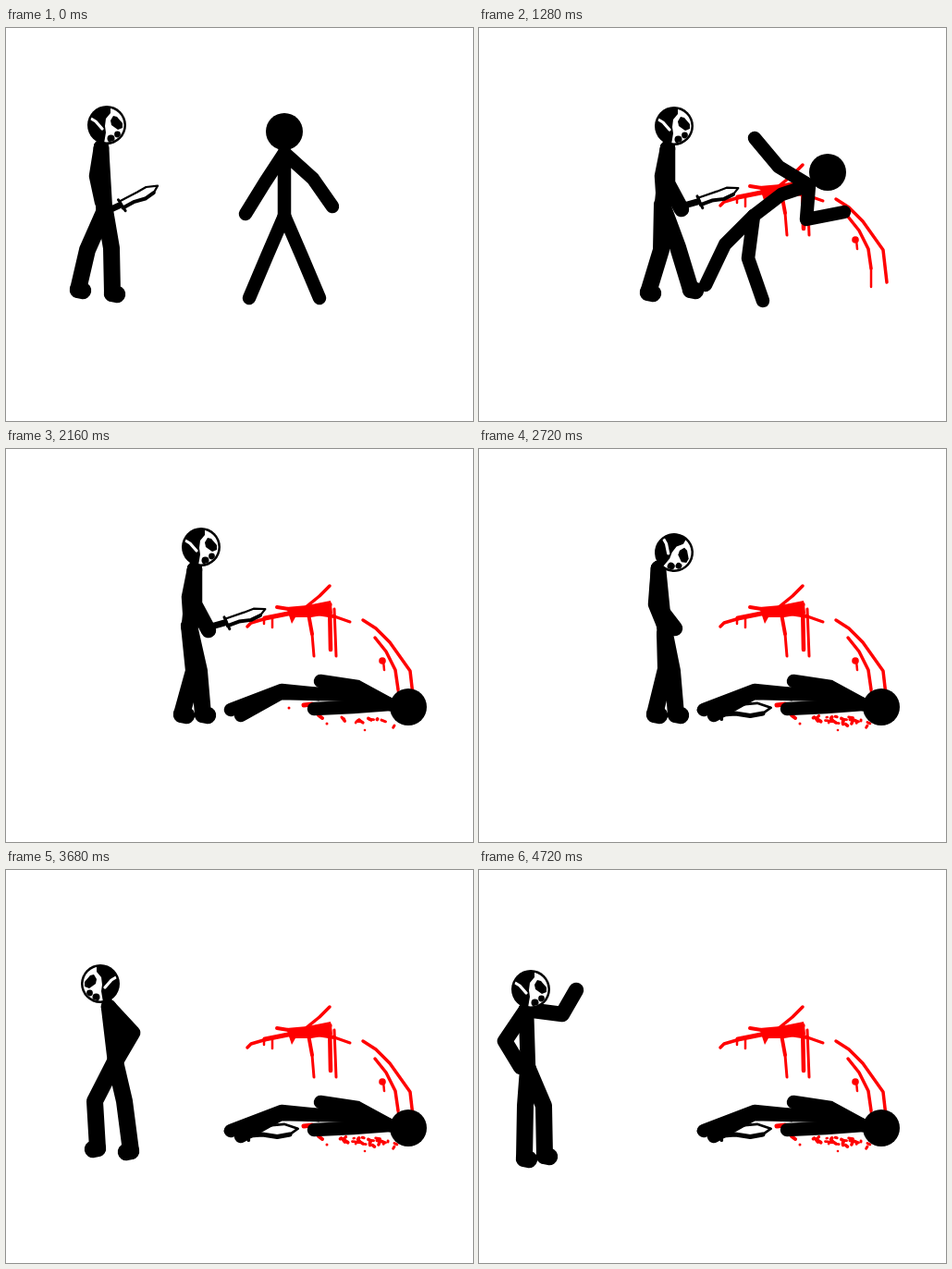
Recreate the animation shown at these times as an HTML page with a canvas. Size 505 by 425 pixels, loop 5.2 s.

```html
<!DOCTYPE html>
<html>
<head>
<meta charset="utf-8">
<style>
html, body { margin: 0; width: 100%; height: 100%; overflow: hidden; background: #fff; }
canvas { display: block; }
</style>
</head>
<body>
<canvas id="stage" width="505" height="425"></canvas>
<script>
const ctx = document.getElementById('stage').getContext('2d');
const LOOP = 5200, TICK = 80, RED = '#f00';
const killer = [], victim = [];

// Each key inherits the points it does not mention from the key before it.
function key(track, time, pose = {}) {
  track.push({ ...track[track.length - 1], ...pose, time });
}

const lerp = (a, b, p) => a + (b - a) * p;
const span = (t, from, to) => Math.min(1, Math.max(0, (t - from) / (to - from)));

function poseAt(track, t) {
  const i = track.findIndex(k => k.time > t);
  if (i < 0) return track[track.length - 1];
  const a = track[i - 1], b = track[i], p = span(t, a.time, b.time), pose = {};
  for (const name in a)
    if (name !== 'time') pose[name] = a[name].map((v, j) => lerp(v, b[name][j], p));
  return pose;
}

// Attacker: approach
key(killer, 0, { head: [109, 105], tilt: [0], face: [1], neck: [103, 129], hip: [107, 197],
  elbowA: [98, 160], handA: [104, 188], elbowB: [103, 164], handB: [106, 202], knife: [-0.43],
  kneeA: [88, 240], footA: [78, 283], kneeB: [114, 238], footB: [115, 287] });
key(killer, 240, { head: [160, 103], neck: [154, 127], hip: [152, 193],
  elbowA: [142, 160], handA: [138, 192], elbowB: [158, 164], handB: [169, 196],
  kneeA: [162, 238], footA: [170, 284], kneeB: [140, 240], footB: [122, 287] });
key(killer, 480, { head: [211, 106], neck: [205, 129], hip: [198, 191],
  elbowA: [179, 158], handA: [174, 192], elbowB: [216, 165], handB: [228, 197], knife: [-0.47],
  kneeA: [197, 240], footA: [183, 286], kneeB: [215, 237], footB: [230, 283] });
// Wind up, strike, pull back
key(killer, 800);
key(killer, 960, { elbowB: [178, 160], handB: [150, 145], knife: [-1.88] });
key(killer, 1120, { elbowA: [188, 160], handA: [186, 192], elbowB: [228, 152], handB: [256, 172], knife: [-0.15] });
key(killer, 1280, { neck: [204, 130], elbowA: [198, 160], handA: [200, 190],
  elbowB: [204, 168], handB: [219, 196], knife: [-0.28], footB: [229, 283] });
key(killer, 1440);
key(killer, 1680, { kneeA: [203, 240], footA: [190, 287], kneeB: [209, 240], footB: [213, 287] });
key(killer, 2480);
key(killer, 2720, { head: [211, 112], tilt: [0.52], neck: [194, 129], hip: [201, 200],
  elbowA: [191, 168], handA: [202, 195], elbowB: [192, 168], handB: [212, 194],
  kneeA: [202, 238], footA: [190, 287] });
// Walk away
key(killer, 3040, { head: [172, 117], tilt: [0], face: [-1], neck: [179, 142], hip: [185, 202],
  elbowA: [198, 173], handA: [190, 198], elbowB: [207, 171], handB: [190, 200],
  kneeA: [161, 245], footA: [150, 295], kneeB: [194, 245], footB: [198, 296] });
key(killer, 3360, { head: [137, 120], neck: [145, 145], hip: [151, 205],
  elbowA: [164, 176], handA: [156, 201], elbowB: [173, 174], handB: [156, 203],
  kneeA: [152, 250], footA: [149, 300], kneeB: [137, 248], footB: [135, 302] });
key(killer, 3600, { head: [107, 122], neck: [115, 147], hip: [121, 206],
  elbowA: [134, 178], handA: [125, 203], elbowB: [142, 176], handB: [125, 205],
  kneeA: [100, 248], footA: [94, 299], kneeB: [128, 250], footB: [135, 303] });
key(killer, 3680, { head: [102, 123], neck: [111, 148], hip: [118, 207],
  elbowA: [130, 178], handA: [121, 203], elbowB: [137, 176], handB: [120, 205],
  kneeA: [96, 250], footA: [99, 301], kneeB: [128, 250], footB: [135, 304] });
key(killer, 3920, { head: [78, 126], neck: [83, 149], hip: [86, 211],
  elbowA: [76, 181], handA: [82, 206], elbowB: [101, 180], handB: [88, 207],
  kneeA: [92, 255], footA: [97, 306], kneeB: [75, 252], footB: [76, 305] });
key(killer, 4160, { head: [56, 129], neck: [51, 151], hip: [53, 215],
  elbowA: [25, 185], handA: [45, 213], elbowB: [58, 183], handB: [57, 212],
  kneeA: [50, 255], footA: [54, 311], kneeB: [70, 255], footB: [76, 309] });
// Turn and wave
key(killer, 4320, { face: [1], elbowA: [28, 185], elbowB: [82, 170], handB: [98, 180], footA: [49, 312], footB: [71, 309] });
key(killer, 4480, { elbowB: [90, 156], handB: [110, 135] });
key(killer, 4600, { handB: [95, 127] });
key(killer, 4720, { handB: [105, 130] });

// Victim: shock, blow, fall
key(victim, 0, { head: [301, 112], neck: [301, 135], mid: [301, 168], hip: [301, 203],
  elbowA: [280, 167], handA: [259, 201], elbowB: [332, 163], handB: [353, 193],
  kneeA: [282, 247], footA: [263, 292], kneeB: [320, 247], footB: [339, 292] });
key(victim, 240, { head: [310, 112], neck: [308, 136], mid: [305, 169],
  elbowA: [277, 154], handA: [262, 150], elbowB: [336, 166], handB: [364, 160],
  kneeA: [274, 242], footA: [259, 289], kneeB: [313, 249] });
key(victim, 480, { head: [318, 113], neck: [314, 138], mid: [308, 170], hip: [302, 203],
  elbowA: [278, 139], handA: [290, 102], elbowB: [335, 168], handB: [346, 130],
  kneeA: [268, 238], footA: [257, 286], kneeB: [308, 250], footB: [340, 289] });
key(victim, 1040);
key(victim, 1280, { head: [377, 156], neck: [357, 170], mid: [327, 180], hip: [297, 203],
  elbowA: [324, 150], handA: [298, 119], elbowB: [354, 207], handB: [395, 199],
  kneeA: [266, 234], footA: [245, 278], kneeB: [291, 249], footB: [307, 295] });
key(victim, 1440);
key(victim, 1680, { head: [424, 236], neck: [404, 235], mid: [345, 231], hip: [320, 234],
  elbowA: [370, 214], handA: [345, 183], elbowB: [365, 243], handB: [323, 251],
  kneeA: [287, 237], footA: [245, 264], kneeB: [291, 248], footB: [259, 287] });
key(victim, 1920, { head: [435, 279], neck: [415, 276], mid: [376, 266], hip: [338, 265],
  elbowA: [380, 257], handA: [340, 251], elbowB: [375, 279], handB: [333, 281],
  kneeA: [298, 261], footA: [243, 282], kneeB: [297, 264], footB: [254, 288] });

function trace(points) {
  ctx.beginPath();
  points.forEach(([x, y]) => ctx.lineTo(x, y));
}
function line(width, color, ...points) {
  trace(points);
  ctx.lineWidth = width;
  ctx.strokeStyle = color;
  ctx.stroke();
}
function fill(color, ...points) {
  trace(points);
  ctx.fillStyle = color;
  ctx.fill();
}
function disc(x, y, r, color) {
  ctx.beginPath();
  ctx.arc(x, y, r, 0, 7);
  ctx.fillStyle = color;
  ctx.fill();
}

function limbs(p, width, legWidth) {
  line(width, '#000', p.neck, p.mid || p.neck, p.hip);
  for (const s of 'AB') {
    line(width, '#000', p.neck, p['elbow' + s], p['hand' + s]);
    line(legWidth, '#000', p.hip, p['knee' + s], p['foot' + s]);
  }
}

function drawMask({ head, tilt, face }) {
  ctx.save();
  ctx.translate(...head);
  ctx.scale(face[0] < 0 ? -1 : 1, 1);
  ctx.rotate(tilt[0]);
  disc(0, 0, 21, '#000');
  ctx.beginPath();
  ctx.arc(0, 0, 18.5, 0, 7);
  ctx.clip();
  fill('#fff', [4, -20], [4, -13], [-1, -7], [-2, 1], [-1, 8], [-3, 20], [20, 20], [20, -20]);
  fill('#000', [4, -5], [7, -10], [11, -9], [17, -2], [17, 3], [12, 5], [5, 0]);
  disc(4.5, 14.5, 4, '#000');
  disc(11.5, 10, 3.4, '#000');
  line(3.2, '#fff', [-17, -7], [-12, -4], [-5, 4]);
  ctx.restore();
}

function drawKnife(x, y, angle, scale) {
  ctx.save();
  ctx.translate(x, y);
  ctx.rotate(angle);
  ctx.scale(scale, scale);
  line(7, '#000', [0, 1], [14, 1]);
  const blade = [[17, -3], [38, -4], [49, -5], [61, -1], [54, 4], [43, 6], [30, 4], [17, 5]];
  fill('#fff', ...blade);
  line(2.2, '#000', ...blade, blade[0]);
  line(4, '#000', ...blade.slice(4));
  line(3, '#000', [16, -5], [18, 9]);
  ctx.restore();
}

function drawSpray(p) {
  if (!p) return;
  ctx.save();
  ctx.beginPath();
  ctx.rect(250, 130, 200 * p, 170);
  ctx.clip();
  line(4, RED, [293, 171], [330, 177], [355, 181]);
  line(3, RED, [355, 181], [372, 187]);
  line(3.5, RED, [261, 192], [265, 188], [282, 183]);
  line(5, RED, [280, 183], [310, 177], [350, 168]);
  line(3.5, RED, [350, 148], [339, 159], [323, 172]);
  fill(RED, [303, 171], [326, 169], [351, 164], [353, 178], [330, 182], [313, 182], [309, 189]);
  line(2.5, RED, [279, 184], [279, 189]);
  line(2.5, RED, [288, 182], [288, 193]);
  line(4, RED, [327, 178], [331, 200]);
  line(3, RED, [331, 200], [333, 224]);
  line(4.5, RED, [350, 168], [351, 217]);
  line(3, RED, [355, 173], [357, 224]);
  line(3.5, RED, [386, 185], [400, 194], [415, 209], [437, 240], [441, 275]);
  line(3.5, RED, [399, 204], [411, 219], [421, 239], [424, 260]);
  line(2.5, RED, [424, 260], [424, 280]);
  disc(407, 229, 3.8, RED);
  line(2.5, RED, [408, 229], [409, 239]);
  ctx.restore();
}

function drawPuddle(p) {
  let seed = 7;
  const rnd = () => (seed = seed * 16807 % 2147483647) / 2147483647;
  for (let i = 0; i < 26 * p; i++) {
    const x = 420 - 60 * rnd() ** 1.2, y = 288 + 12 * rnd() * span(x, 345, 400);
    line(2.5 + rnd() * 1.5, RED, [x, y], [x + rnd() * 8 - 3, y + rnd() * 3]);
  }
  if (p > 0.3) {
    line(5, RED, [322, 277], [331, 276]);
    line(4, RED, [338, 288], [342, 291]);
    line(3, RED, [363, 290], [366, 294]);
    disc(347, 297, 1.5, RED);
    disc(388, 304, 1.3, RED);
    disc(306, 280, 1.5, RED);
  }
}

function draw(t) {
  const k = poseAt(killer, t), v = poseAt(victim, t);
  ctx.fillStyle = '#fff';
  ctx.fillRect(0, 0, 505, 425);
  ctx.lineCap = ctx.lineJoin = 'round';

  drawSpray(span(t, 1040, 1280));
  drawPuddle(span(t, 1960, 2480));

  const drop = span(t, 2240, 2560), fall = drop * drop;
  drawKnife(lerp(k.handB[0] + 3, 240, drop), lerp(k.handB[1] - 5, 281, fall),
    lerp(k.knife[0], 0, drop), lerp(1, 1.24, drop));

  limbs(v, 14.5, 14.5);
  disc(...v.head, 20, '#000');

  limbs(k, 16.5, 18);
  for (const [x, y] of [k.footA, k.footB])
    line(18.5, '#000', [x, y], [x + 5 * k.face[0], y + 1]);
  drawMask(k);
}

const start = performance.now();
function frame() {
  const t = (performance.now() - start) % LOOP;
  draw(Math.floor(t / TICK) * TICK);
  requestAnimationFrame(frame);
}
frame();
</script>
</body>
</html>
```
